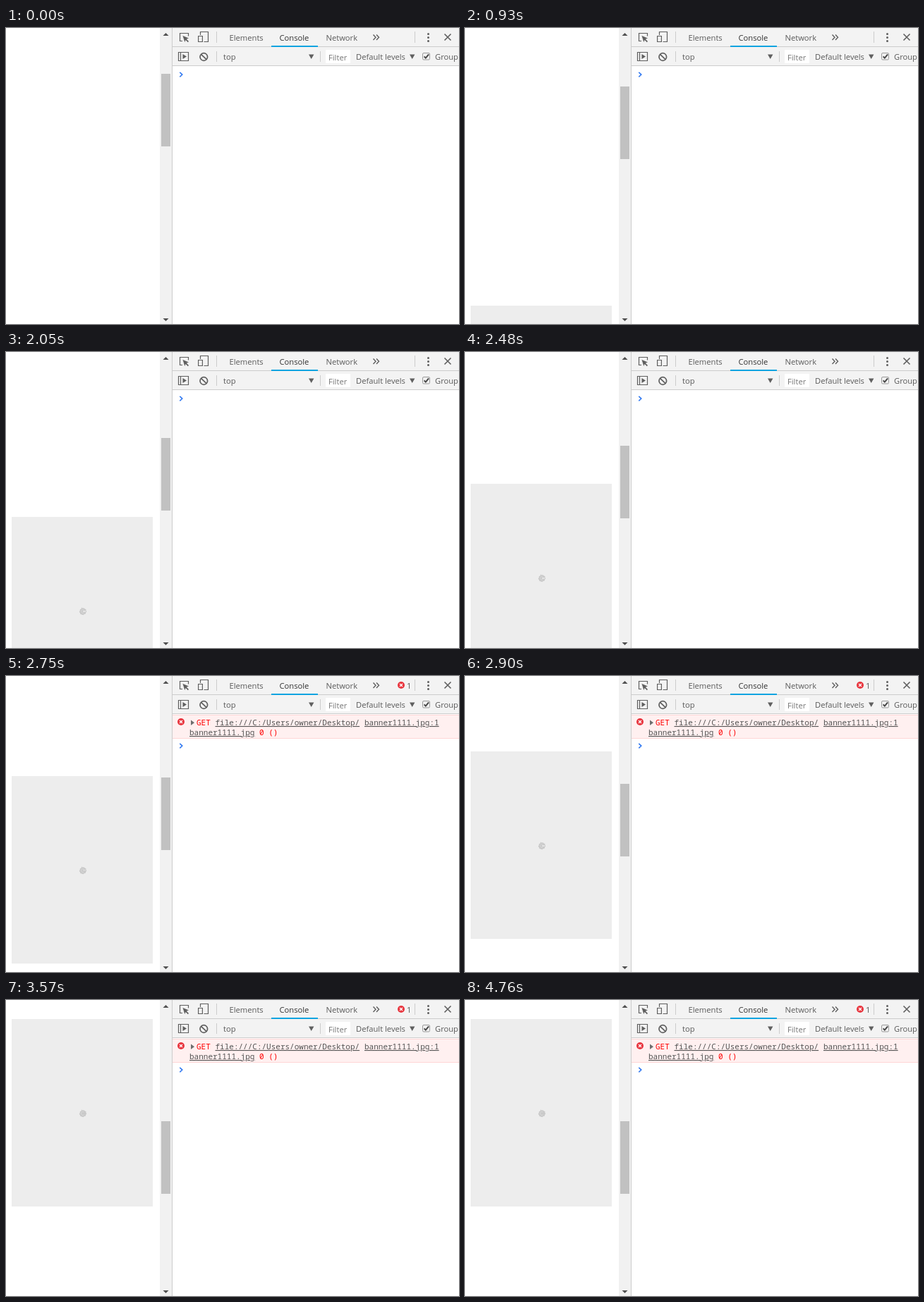
These frames come from a looping animation (642x420 px, 5.5 s). An HTML page:

```html
<!DOCTYPE html>
<html lang="en">
<head>
<meta charset="utf-8">
<title>Lazy loading with console</title>
<style>
  html, body { margin: 0; width: 100%; height: 100%; overflow: hidden; background: #fff; }
  svg { display: block; }
  text { font: 11.2px "Open Sans", "Noto Sans", sans-serif; fill: #5a5a5a; }
  .mono text { font: 11px "Noto Sans Mono", "Liberation Mono", monospace; fill: #f00; }
  .mono .link { fill: #545454; text-decoration: underline; }
  .icon { fill: none; stroke: #5f5f5f; stroke-width: 1.2; }
  .solid { fill: #5f5f5f; }
  .rule { fill: #ccc; }
  .crisp { shape-rendering: crispEdges; }
</style>
</head>
<body>
<svg width="642" height="420" viewBox="0 0 642 420">
  <defs>
    <g id="fail">
      <circle r="5" fill="#e8353e"/>
      <path d="M-2-2 2 2M2-2-2 2" stroke="#fff" stroke-width="1.3"/>
    </g>
    <path id="drop" d="M0 0h7.4l-3.7 6.4z" class="solid"/>
  </defs>

  <!-- page -->
  <g id="image">
    <rect x="8" width="200" height="266" fill="#ededed" class="crisp"/>
    <g id="spinner">
      <path d="M107 128.6l1.6 1 1.8-.4 1.4 1.4 1.8.6-.3 1.6 1 1.6-1.2 1.4-.2 1.8-2 .5-1.6 1.2-2-.8-1.8-.4-.6-1.8-1.2-1.5 1-1.6.2-2 1.8-.6z" fill="#c9c9c9"/>
      <path d="M110.5 132.2a2.4 2.4 0 1 0 .2 3.5" fill="none" stroke="#dadada"/>
      <g fill="#e2e2e2" class="crisp">
        <rect class="lit" x="109" y="133" width="4" height="1"/>
        <rect class="lit" x="109" y="134" width="4" height="1"/>
      </g>
    </g>
  </g>

  <!-- scrollbar -->
  <g class="crisp">
    <rect x="218" width="17" height="420" fill="#f1f1f1"/>
    <rect id="thumb" x="220" width="13" height="103" fill="#c1c1c1"/>
  </g>
  <path d="M222.5 11h8l-4-4zM222.5 412h8l-4 4z" fill="#505050"/>

  <!-- toolbars -->
  <g class="crisp">
    <rect x="236" width="406" height="53" fill="#f3f3f3"/>
    <g class="rule">
      <rect x="235" width="1" height="420"/>
      <rect x="236" y="26" width="406" height="1"/>
      <rect x="236" y="53" width="406" height="1"/>
      <rect x="298" y="5" width="1" height="16"/>
      <rect x="579" y="5" width="1" height="16"/>
      <rect x="298" y="33" width="1" height="15"/>
      <rect x="445" y="33" width="1" height="15"/>
    </g>
    <rect x="376" y="25" width="66" height="2" fill="#10a4e0"/>
    <rect x="453" y="31" width="35" height="19" fill="#fff"/>
  </g>

  <text x="316.5" y="18">Elements</text>
  <text x="387.5" y="18" style="fill:#333">Console</text>
  <text x="453.5" y="18">Network</text>
  <text x="308" y="45">top</text>
  <text x="457" y="46" style="fill:#757575">Filter</text>
  <text x="496" y="45">Default levels</text>
  <text x="608" y="45">Group</text>

  <g class="icon">
    <path d="M250 18.5h-3.5v-11h12v4"/>
    <path d="M275.5 10v-4.500h11v14h-6M272.600 11.500h5.800v8h-5.800z"/>
    <path d="M520.500 9.500l3.500 3.700-3.500 3.700M525 9.500l3.500 3.700-3.500 3.700" stroke-width="1.4"/>
    <path d="M621.500 8.500l9 9M630.500 8.500l-9 9" stroke-width="1.6"/>
    <path d="M244.500 34.500h14v12h-14zM247.500 34.500v12"/>
    <circle cx="280.300" cy="41" r="5.300" stroke-width="1.700"/>
    <path d="M276.500 37.300l7.600 7.400" stroke-width="1.700"/>
  </g>
  <g class="solid">
    <path d="M250.500 11l8.500 3.400-3.200 1.300 3.200 3.300-1.200 1.200-3.200-3.300-1.300 3z"/>
    <path d="M250.500 37l5.500 3.500-5.500 3.500z"/>
    <circle cx="598.500" cy="8.500" r="1.500"/>
    <circle cx="598.500" cy="13.500" r="1.500"/>
    <circle cx="598.500" cy="18.500" r="1.500"/>
  </g>
  <use href="#drop" x="429" y="37.500"/>
  <use href="#drop" x="572" y="37.500"/>
  <rect x="590.500" y="35.500" width="10" height="9.500" rx="1.500" fill="#f0f0f0" stroke="#9a9a9a"/>
  <path d="M592.600 40.300l2.200 2.300 4.300-5.300" fill="none" stroke="#444" stroke-width="1.900"/>

  <!-- console -->
  <g id="error">
    <use href="#fail" x="560" y="13"/>
    <text x="568" y="18">1</text>
    <g class="crisp">
      <rect x="236" y="55" width="406" height="34" fill="#ffd6d6"/>
      <rect x="236" y="56" width="406" height="32" fill="#fff0f0"/>
    </g>
    <use href="#fail" x="248" y="65"/>
    <path d="M262 62.500l5 3.800-5 3.800z" fill="#6e6e6e"/>
    <g class="mono">
      <text x="270" y="70">GET</text>
      <text x="296.500" y="70" class="link">file:///C:/Users/owner/Desktop/</text>
      <text x="508" y="70" class="link">banner1111.jpg:1</text>
      <text x="260" y="84" class="link">banner1111.jpg</text>
      <text x="359" y="84">0 ()</text>
    </g>
  </g>
  <path id="prompt" d="M246.300 62.800l3.500 3.300-3.500 3.300" fill="none" stroke="#367cf1" stroke-width="1.600"/>
</svg>

<script>
  const LOOP = 5500, ERROR_AT = 2750, SPIN_AT = 1900, END_TOP = 27;

  // [time, top of the image]
  const steps = [
    [0, 467], [530, 460], [650, 427], [930, 394], [1080, 387], [1200, 347],
    [1500, 310], [1630, 307], [1780, 300], [1900, 267], [2050, 234],
    [2210, 227], [2330, 222], [2480, 187], [2630, 147], [2750, 142],
    [2900, 107], [3020, 101], [3170, 67], [3420, 62], [3570, END_TOP],
    [3850, END_TOP], [4000, END_TOP], [4150, END_TOP],
    [4460, END_TOP], [4610, END_TOP], [4760, END_TOP]
  ];

  const el = id => document.getElementById(id);
  const image = el("image"), spinner = el("spinner"), thumb = el("thumb");
  const error = el("error"), prompt = el("prompt");
  const lit = document.querySelectorAll(".lit");
  const show = (node, on) => node.setAttribute("visibility", on ? "visible" : "hidden");
  const moveY = (node, y) => node.setAttribute("transform", `translate(0 ${y})`);

  function draw(t) {
    const i = steps.findLastIndex(step => step[0] <= t);
    const top = steps[i][1];
    const failed = t >= ERROR_AT;
    const spinning = t >= SPIN_AT;

    moveY(image, top);
    thumb.setAttribute("y", Math.round(172 - (top - END_TOP) * 107 / 440));
    show(spinner, spinning);
    lit.forEach((row, n) => show(row, spinning && n < (i + 1) % 3));
    show(error, failed);
    moveY(prompt, failed ? 33 : 0);
  }

  const start = performance.now();
  function tick() {
    draw((performance.now() - start) % LOOP);
    requestAnimationFrame(tick);
  }
  tick();
</script>
</body>
</html>
```
